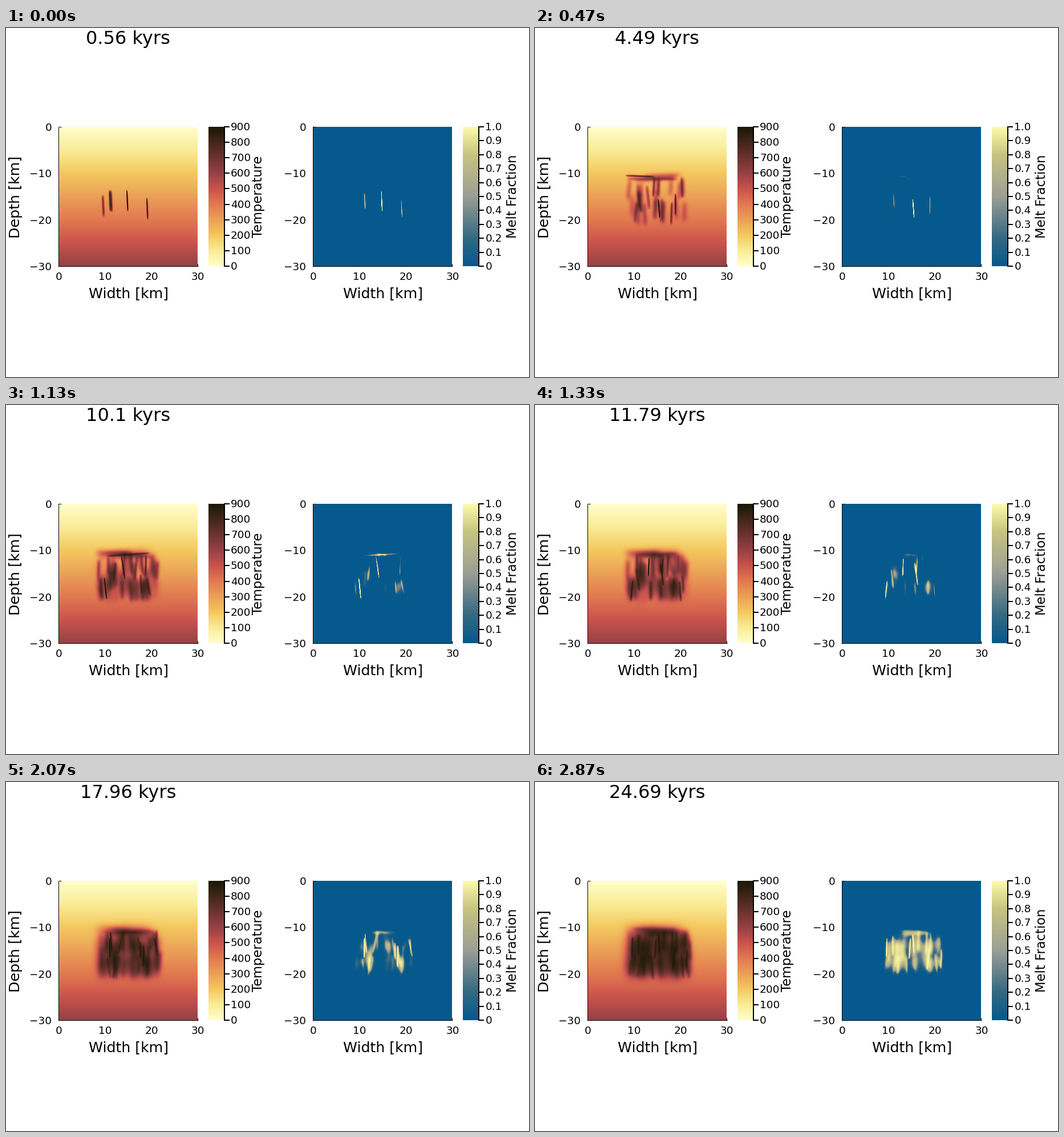
These frames come from a looping animation (917x611 px, 2940 ms). A matplotlib script:

```python
import numpy as np
import matplotlib.pyplot as plt
from matplotlib.animation import FuncAnimation
from matplotlib.colors import LinearSegmentedColormap

W, H, DPI = 917, 611, 100
LOOP, TICK = 2940, 20          # ms
STEPS, KYR = 44, 0.5612
N, SIZE = 244, 30.0            # cells per side, km per side
CELL = SIZE / N
T_MAGMA = 900.0
SPREAD = 1.35                  # diffusion length per step, in cells
DIKE = 0.28                    # dike thickness, km

plt.rcParams["font.family"] = "DejaVu Sans"


def pt(px):
    return px * 72 / DPI


def ramp(name, stops):
    return LinearSegmentedColormap.from_list(name, list(stops.items()), 512)


HEAT = ramp("heat", {0: "#fffecb", 1 / 9: "#faec96", 2 / 9: "#f4c85f",
                     4 / 9: "#e27950", 5 / 9: "#c9534c", 6 / 9: "#964144",
                     1: "#191905"})
MELT = ramp("melt", {0: "#05598c", 0.2: "#346982", 0.5: "#9b9e94",
                     0.8: "#c7c480", 1: "#fefaac"})

# Centres (x, depth in km) of the dikes that open the sequence
OPENING = [(9.65, 17), (11.4, 16), (11.1, 15.9), (19.15, 17.6), (14.85, 15.9)]

mid = (np.arange(N) + 0.5) * CELL
X, Z = np.meshgrid(mid, mid)
GEOTHERM = 20 * Z
FREQ2 = np.fft.fftfreq(N)[:, None] ** 2 + np.fft.rfftfreq(N)[None] ** 2


def diffuse(heat, share):
    kernel = np.exp(-2 * np.pi ** 2 * SPREAD ** 2 * share * FREQ2)
    return np.fft.irfft2(np.fft.rfft2(heat) * kernel, s=(N, N))


def intrude(heat, x, z, dx, dz):
    """Fill a thin lens centred at x, z with magma; dx, dz reach to a tip."""
    half_len = np.hypot(dx, dz)
    along = ((X - x) * dx + (Z - z) * dz) / half_len ** 2
    across = np.abs((X - x) * dz - (Z - z) * dx) / half_len
    half = DIKE / 2 * np.sqrt(np.clip(1 - along ** 4, 0, 1))
    mask = np.clip((half - across) / CELL + 0.5, 0, 1) * (np.abs(along) < 1)
    return heat + (T_MAGMA - GEOTHERM - heat) * mask


def dike(rng, step, index):
    """Steep dike; the swarm swells sideways at mid depth as it grows."""
    z = 15.85 - 2.95 * np.cos(np.pi * rng.random())
    swell = 1.4 * np.sqrt(step / STEPS) * (1 - ((z - 16) / 5.5) ** 2)
    u = (index * 0.618034 + rng.normal(0, 0.08)) % 1
    x = 15 + (5.9 + swell) * (2 * u ** 0.88 - 1)
    return x, z, rng.normal(0, 0.2), rng.uniform(1.9, 2.6)


def sill(rng):
    """Nearly flat sheet along the roof."""
    reach = rng.uniform(2.5, 5.5)
    x = 15 + rng.uniform(-1, 1) * (7.2 - reach)
    return x, rng.uniform(10.4, 11.4), reach, rng.normal(0, 0.2)


def bodies_at(step, rng):
    if step == 0:
        return [(x, z, 0.1, 2.3) for x, z in OPENING]
    count = 4 if step < 12 else 5
    bodies = [dike(rng, step, step * 5 + i) for i in range(count)]
    if rng.random() < 0.45:
        bodies[rng.integers(count)] = sill(rng)
    return bodies


def simulate():
    rng = np.random.default_rng(5)
    heat, fields = np.zeros((N, N)), []
    for step in range(STEPS):
        bodies = bodies_at(step, rng)
        for body in bodies:
            heat = intrude(diffuse(heat, 1 / len(bodies)), *body)
        fields.append(GEOTHERM + heat)
    return fields


def melt_fraction(temp):
    return 1 / (1 + np.exp((800 - temp) / 23))


temps = simulate()
melts = [melt_fraction(t) for t in temps]

fig = plt.figure(figsize=(W / DPI, H / DPI), dpi=DPI, facecolor="white")
ax = fig.add_axes([0, 0, 1, 1])
ax.axis("off")

X0, Y0, SIDE = 92, 173, 244
Y1 = Y0 + SIDE
RIGHT = 446.4                  # offset of the second panel
BAR, BAR_W = 355, 27.5


def line(x1, y1, x2, y2, width=2):
    ax.plot([x1, x2], [y1, y2], color="black", lw=pt(width), zorder=3,
            solid_capstyle="butt")


def label(x, y, text, size, ha="center", rotation=0):
    return ax.text(x, y, text, fontsize=pt(size), ha=ha, va="baseline",
                   rotation=rotation, rotation_mode="anchor", color="black")


def picture(data, left, width, cmap, vmax):
    return ax.imshow(data, extent=(left, left + width, Y1, Y0), cmap=cmap,
                     vmin=0, vmax=vmax, interpolation="nearest",
                     aspect="auto", zorder=2)


def panel(off, data, cmap, vmax, bar_ticks, bar_title):
    left = X0 + off
    image = picture(data, left, SIDE, cmap, vmax)
    line(left, Y0, left, Y1 + 1, 1)
    line(left, Y1, left + SIDE + 1, Y1, 1)
    line(left, Y0, left + 5, Y0, 1)
    line(left + SIDE, Y1, left + SIDE, Y1 - 4, 1)
    for i in range(4):
        at = i * SIDE / 3
        label(left - 12, Y0 + at + 7, f"\u2212{i * 10}" if i else "0",
              18.5, "right")
        label(left + at + 0.5, 441.4, str(i * 10), 18.5)
    label(left + SIDE / 2 + 1, 472.3, "Width [km]", 25.3)

    bar = BAR + off
    edge = bar + BAR_W
    picture(np.linspace(vmax, 0, 488)[:, None], bar, BAR_W, cmap, vmax)
    line(edge, Y0 - 1, edge, Y1 + 1)
    for i, text in enumerate(bar_ticks):
        y = Y1 - i * SIDE / (len(bar_ticks) - 1)
        line(edge, y, edge + 9.5, y)
        label(394 + off, y + 6, text, 18.5, "left")
    label(448.5 + off, 295, bar_title, 22.6, rotation=90)
    return image


heat_img = panel(0, temps[0], HEAT, 900,
                 [str(100 * i) for i in range(10)], "Temperature")
melt_img = panel(RIGHT, melts[0], MELT, 1,
                 ["0"] + [f"{i / 10:.1f}" for i in range(1, 11)],
                 "Melt Fraction")
label(24, 295.5, "Depth [km]", 25.4, rotation=90)
title = label(214.5, 28, "", 32.2)

ax.set_xlim(0, W)
ax.set_ylim(H, 0)


def update(i):
    ms = i * TICK + TICK / 2
    step = min(STEPS - 1, int((ms + 3.4) * 15 / 1000))
    heat_img.set_data(temps[step])
    melt_img.set_data(melts[step])
    title.set_text(f"{round((step + 1) * KYR, 2)} kyrs")
    return heat_img, melt_img, title


anim = FuncAnimation(fig, update, frames=LOOP // TICK, interval=TICK,
                     repeat=True, repeat_delay=0, blit=False)
plt.show()
```
